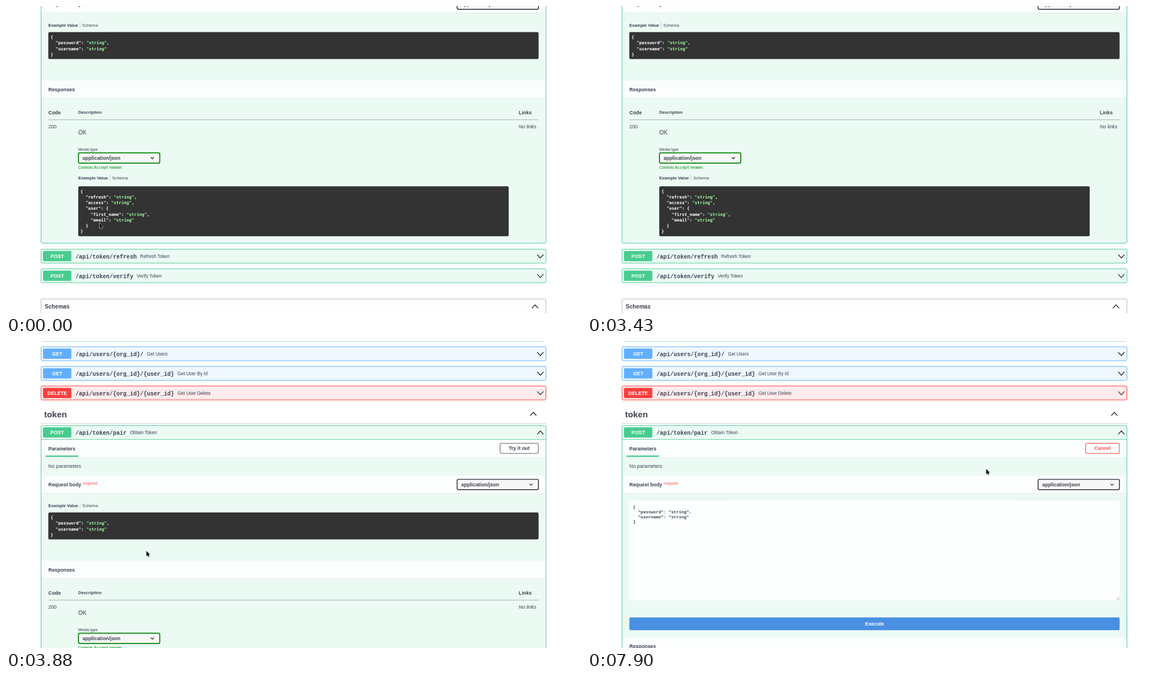
An HTML page for the animation above (8000 ms loop, 1025 px wide and 547 px high).

```html
<!DOCTYPE html>
<html lang="en">
<head>
<meta charset="utf-8">
<title>API documentation</title>
<style>
  html, body { margin: 0; width: 100%; height: 100%; overflow: hidden; background: #fff; }
  svg { display: block; width: 100vw; height: 100vh; }
  text { font-family: "Liberation Sans", Arial, sans-serif; fill: #3b4151; white-space: pre; }
  .b { font-weight: 700; }
  .i { font-style: italic; }
  .mid { text-anchor: middle; }
  .path, .edit { font-family: "Liberation Mono", "Courier New", monospace; font-weight: 700; }
  .code { font-family: "DejaVu Sans Mono", monospace; font-weight: 700; fill: #fff; }
  .str { fill: #a2fca2; }
  .white { fill: #fff; }
  .red { fill: #ff5050; }
  .green { fill: #008000; }
  .mono { font-family: "DejaVu Sans Mono", monospace; font-size: 7.2px; }
  .trial .view, svg:not(.trial) .form { display: none; }
</style>
</head>
<body>
<svg id="stage" viewBox="0 0 1025 547">
  <g id="page"><g id="shapes"></g><g id="marks"></g><g id="labels"></g></g>
  <g id="cursor">
    <path class="arrow" d="M0 0V9.4L2.1 7.4 3.6 10.7 5.1 10 3.7 6.8H6.5Z" stroke="#fff" stroke-width="1" paint-order="stroke"/>
    <path class="beam" d="M-3-5.5Q0-5.5 0-3.5V3.5Q0 5.5-3 5.5M3-5.5Q0-5.5 0-3.5M0 3.5Q0 5.5 3 5.5M-1.5 1.5H1.5" fill="none" stroke="#333" stroke-width="1"/>
    <path class="hand" d="M-1 0Q0-1 1 0V4L5 5Q6 5 6 7L5 11H-1L-4 7Q-4 5-1 7Z" fill="#fff" stroke="#222" stroke-width=".8"/>
  </g>
</svg>
<script>
const $ = id => document.getElementById(id);
const stage = $('stage'), page = $('page'), marks = $('marks'), cursor = $('cursor');
const GREEN = '#49cc90', BLUE = '#61affe', RED = '#f93e3e', INK = '#3b4151';
const CHAR = 4.56, LINE = 10.15;
let shapes = '', labels = '', view = '';

const rectMarkup = (x, y, w, h, attrs) => `<rect x="${x}" y="${y}" width="${w}" height="${h}" ${attrs}/>`;
function rect(x, y, w, h, fill, stroke = 'none', width = 1, radius = 0) {
  shapes += rectMarkup(x, y, w, h,
    `class="${view}" fill="${fill}" stroke="${stroke}" stroke-width="${width}" rx="${radius}"`);
}
function path(d, stroke = INK, width = 1) {
  shapes += `<path class="${view}" d="${d}" fill="none" stroke="${stroke}" stroke-width="${width}"/>`;
}
// y is the middle of the capitals.
function label(x, y, text, size = 8.85, style = '') {
  labels += `<text class="${view} ${style}" x="${x}" y="${y + size * .36}" font-size="${size}">${text}</text>`;
}
function chevron(x, y, dir, w = 5.5, h = 3, width = 1.3) {
  path(`M${x - w} ${y - h * dir}L${x} ${y + h * dir}L${x + w} ${y - h * dir}`, '#222', width);
}
function endpoint(y, method, url, summary, color, open) {
  if (!open) rect(62.5, y, 900, 24.8, color + '1a', color, 1, 2.5);
  rect(66, y + 3.3, 50.5, 18.2, color, 'none', 0, 2);
  label(91.3, y + 12.5, method, 8.85, 'b mid white');
  label(124, y + 12.9, url, 10.1, 'path');
  label(124 + url.length * 6.06 + 6, y + 12.6, summary, 8.2);
  chevron(952.5, y + 12.7, open ? -1 : 1);
}
function band(y, h) {
  rect(63, y, 899, h, '#fffc');
  path(`M63 ${y + h}H962`, '#0001');
}
function select(x, y, color) {
  rect(x, y, 145, 18.3, '#f7f7f7', color, 1.7, 2.5);
  label(x + 7.4, y + 9.1, 'application/json', 8.85, 'b');
  chevron(x + 131.7, y + 9.3, 1, 2.8, 1.4, 1.2);
}
function exampleTabs(x, y) {
  label(x, y, 'Example Value', 7.58, 'b');
  path(`M${x + 56.5} ${y - 5}V${y + 5}`, '#3b415155', .7);
  label(x + 60.6, y, 'Schema', 7.58);
}
function button(x, w, text, color, style) {
  rect(x, 182.3, w, 18, '#fff4', color, 1.3, 2.5);
  label(x + w / 2, 191.3, text, 8.85, 'b mid ' + style);
}
function codeBlock(block, width, height) {
  rect(block.x - 4, block.y - 9, width, height, '#333', 'none', 0, 2.5);
  block.lines.forEach((line, i) => label(block.x, block.y + i * LINE,
    line.replace(/"string"/g, '<tspan class="str">$&</tspan>'), 7.57, 'code'));
}

const request = { x: 79.4, y: 314.6,
  lines: ['{', '  "password": "string",', '  "username": "string"', '}'] };
const response = { x: 132.8, y: 589.2,
  lines: ['{', '  "refresh": "string",', '  "access": "string",', '  "user": {',
    '    "first_name": "string",', '    "email": "string"', '  }', '}'] };

function drawPage() {
  rect(62.5, -30, 900, 30, GREEN + '1a', GREEN, 1, 2.5);
  endpoint(10.3, 'GET', '/api/users/{org_id}/', 'Get Users', BLUE);
  endpoint(45.3, 'GET', '/api/users/{org_id}/{user_id}', 'Get User By Id', BLUE);
  endpoint(80.2, 'DELETE', '/api/users/{org_id}/{user_id}', 'Get User Delete', RED);
  label(68, 130.5, 'token', 15.15, 'b');
  chevron(940, 130, -1);
  path('M62 147H963', '#3b41514d', .8);

  rect(62.5, 150.7, 900, 530.8, GREEN + '1a', GREEN, 1, 2.5);
  endpoint(150.5, 'POST', '/api/token/pair', 'Obtain Token', GREEN, true);
  path('M62.5 175.5H962.5', GREEN, .8);
  band(176, 32);
  label(75.5, 191.6, 'Parameters', 8.85, 'b');
  rect(70.5, 204, 58, 2.5, GREEN);
  label(75.5, 222.4, 'No parameters');
  band(239.7, 32);
  label(75.5, 255.8, 'Request body', 8.85, 'b');
  label(137, 253, 'required', 6.95, 'red');
  select(804.2, 246.5, '#41444e');

  view = 'view';
  button(880.8, 68, 'Try it out', '#808080', '');
  exampleTabs(75.5, 293);
  codeBlock(request, 874, 48);
  band(391.7, 32);
  label(75.5, 407.5, 'Responses', 8.85, 'b');
  label(75.5, 448.7, 'Code', 8.85, 'b');
  label(128.7, 448.6, 'Description', 7.58, 'b');
  label(914, 448.7, 'Links', 8.85, 'b');
  path('M75.5 461.7H949.5', '#3b415180', .8);
  label(75.5, 473.6, '200');
  label(914, 473.6, 'No links', 8.85, 'i');
  label(128.7, 484.6, 'OK', 10.4);
  label(128.7, 514.4, 'Media type', 7.1);
  select(129.2, 520.6, '#008000');
  label(128.7, 546.3, 'Controls <tspan class="green mono">Accept</tspan> header.', 7, 'green');
  exampleTabs(128.7, 565.5);
  codeBlock(response, 767.3, 89);
  endpoint(692.3, 'POST', '/api/token/refresh', 'Refresh Token', GREEN);
  endpoint(727.2, 'POST', '/api/token/verify', 'Verify Token', GREEN);
  rect(62.5, 781, 900, 60, '#fefefe', '#3b41515a', 1, 2.5);
  label(69, 794.2, 'Schemas', 10.1, 'b');
  chevron(943, 794.5, -1);

  view = 'form';
  button(889, 60, 'Cancel', '#ff6060', 'red');
  rect(75.5, 284.3, 874, 177.7, '#fcfffd', 'none', 0, 2);
  path('M944 461L949 456M947 461L949 459', '#777', .7);
  request.lines.forEach((line, i) => label(82, 295.4 + i * 8.75, line, 7.57, 'edit'));
  rect(75.5, 492.6, 874, 22.6, '#4990e2', 'none', 0, 2.5);
  label(512.5, 504, 'Execute', 8.85, 'b mid white');
  band(528, 32);
  label(75.5, 544, 'Responses', 8.85, 'b');

  $('shapes').innerHTML = shapes;
  $('labels').innerHTML = labels;
}

function codeMarks(block, fromLine, fromCol, toLine, toCol) {
  return block.lines.map((line, i) => {
    if (i < fromLine || i > toLine) return '';
    const start = i === fromLine ? fromCol : 0;
    const end = i === toLine ? toCol : line.length + 1;
    return rectMarkup(block.x + start * CHAR, block.y + i * LINE - 5, (end - start) * CHAR, LINE + .1, 'fill="#5682ae"');
  }).join('');
}
const textMarks = (...boxes) => boxes.map(([x, y, w]) => rectMarkup(x, y - 5.3, w, 11, 'fill="#b3d7fe"')).join('');
const tableMarks = () => textMarks([75.5, 448.7, 25], [128.7, 448.7, 45], [914, 448.7, 26], [75.5, 473.6, 15],
  [128.7, 484.6, 16], [128.7, 514.4, 35], [128.7, 546.3, 80], [128.7, 565.5, 89]);

// The picture advances in steps of equal length.
const STEP = 148.85, LOOP = 8000;
const moves = [
  [0, 'arrow', 166.7, 386.7], [2, 'beam', 155, 404], [6, 'beam', 140, 333], [7, 'beam', 140, 333],
  [8, 'beam', 134, 329], [9, 'beam', 139, 332], [10, 'beam', 139, 332], [11, 'beam', 144.5, 350],
  [13, 'beam', 146, 393], [14, 'beam', 141, 406], [15, 'arrow', 126, 411], [16, 'beam', 140, 407],
  [17, 'beam', 150, 406], [18, 'beam', 150, 406], [23, 'beam', 251, 375.5], [25, 'arrow', 250.3, 374],
  [27, 'arrow', 250.3, 374], [29, 'beam', 205, 343], [31, 'beam', 181, 335], [34, 'arrow', 73, 329],
  [35, 'arrow', 63.8, 325.5], [37, 'arrow', 61.5, 313], [38, 'arrow', 61.5, 313], [39, 'beam', 104, 323],
  [40, 'beam', 148, 324], [41, 'beam', 148, 324], [42, 'arrow', 240, 302], [48, 'arrow', 875, 210],
  [49, 'hand', 907, 191], [51, 'hand', 907, 191], [52, 'arrow', 800, 214], [53, 'arrow', 711.6, 228]
];
const selections = [
  [0, () => ''],
  [9, () => codeMarks(response, 0, 0, 0, 1)],
  [12, () => codeMarks(response, 0, 0, 4, 2)],
  [13, () => codeMarks(response, 0, 0, 6, 3)],
  [14, () => codeMarks(response, 0, 0, 7, 1)],
  [15, tableMarks],
  [16, () => codeMarks(response, 0, 0, 7, 1)],
  [19, () => ''],
  [32, () => codeMarks(request, 2, 14, 2, 22)],
  [33, () => codeMarks(request, 2, 7, 2, 22)],
  [34, () => codeMarks(request, 2, 0, 2, 22)],
  [35, () => codeMarks(request, 1, 0, 2, 22)],
  [36, () => codeMarks(request, 0, 0, 2, 22)],
  [39, () => codeMarks(request, 1, 5, 2, 22)],
  [40, () => codeMarks(request, 1, 15, 2, 22)],
  [42, () => '']
];
const scrolls = [[0, 259], [24, 217.7], [25, 80], [26, 0]];
const FORM_OPENS = 51;
const latest = (table, step) => table.findLast(row => row[0] <= step);

function show(step) {
  const from = latest(moves, step);
  const to = moves[moves.indexOf(from) + 1] || from;
  const part = to === from ? 0 : (step - from[0]) / (to[0] - from[0]);
  const at = i => from[i] + (to[i] - from[i]) * part;
  cursor.setAttribute('transform', `translate(${at(2)} ${at(3)})`);
  for (const shape of cursor.children) shape.style.display = shape.matches('.' + from[1]) ? '' : 'none';
  page.setAttribute('transform', `translate(0 ${-latest(scrolls, step)[1]})`);
  marks.innerHTML = latest(selections, step)[1]();
  stage.classList.toggle('trial', step >= FORM_OPENS);
}

drawPage();
const begin = performance.now();
let shown = -1;
function tick() {
  const step = Math.floor((performance.now() - begin) % LOOP / STEP);
  if (step !== shown) show(shown = step);
  requestAnimationFrame(tick);
}
tick();
</script>
</body>
</html>
```
